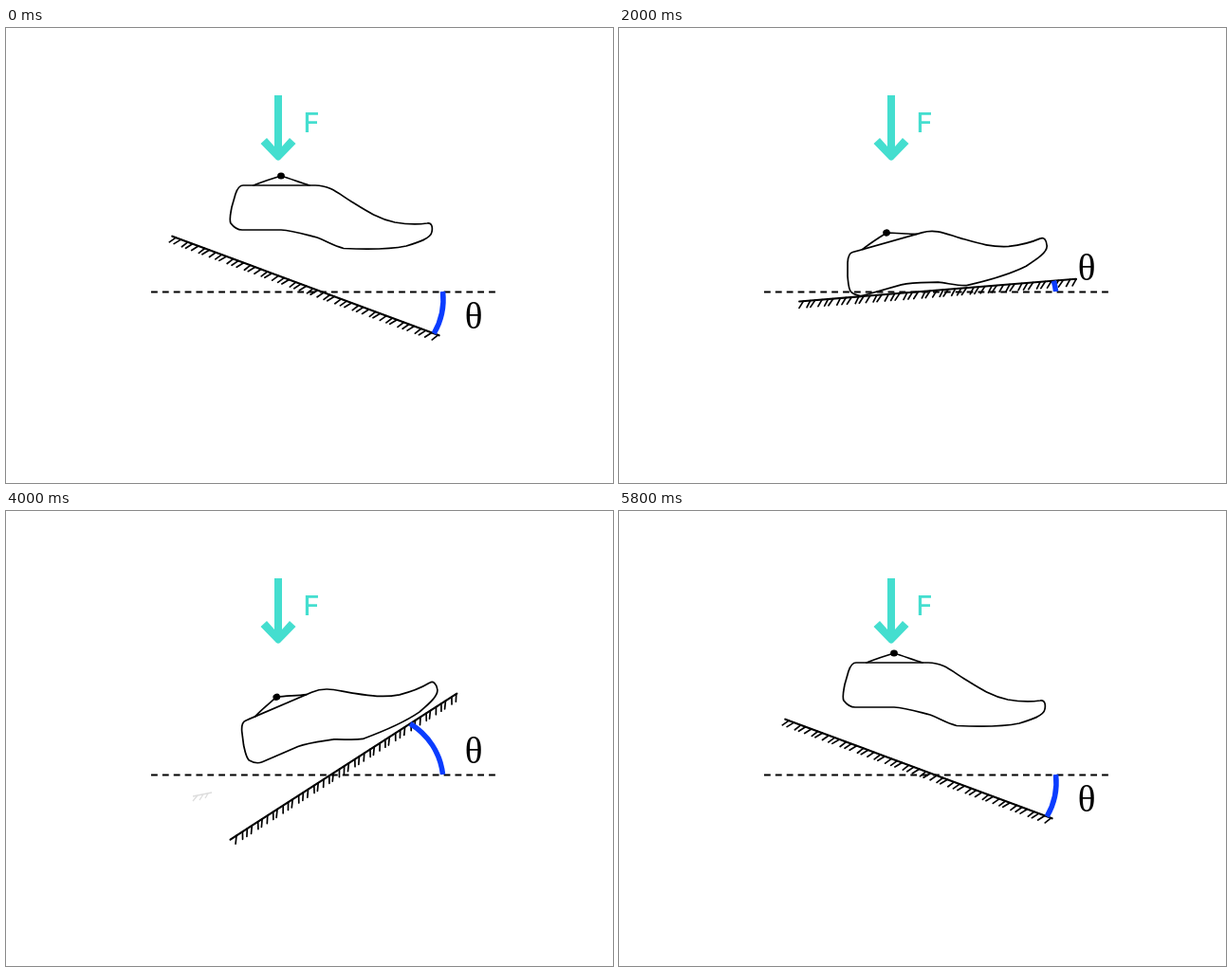
Recreate the animation shown at these times as an HTML page. Size 640 by 480 pixels, loop 6.2 s.

```html
<!DOCTYPE html>
<html lang="en">
<head>
<meta charset="utf-8">
<title>Foot on a tilting surface</title>
<style>
  html, body { margin: 0; width: 100%; height: 100%; overflow: hidden; background: #fff; }
  svg { display: block; width: 640px; height: 480px; }
  .ink { fill: none; stroke: #000; stroke-linejoin: round; stroke-linecap: round; }
  .force { fill: #44decf; }
  .force text { font: 500 29px Inter, sans-serif; }
  #theta { font: 39px "Liberation Serif", "Times New Roman", serif; text-anchor: middle; }
</style>
</head>
<body>
<svg viewBox="0 0 640 480">
  <clipPath id="view"><rect width="640" height="357"/></clipPath>

  <g class="force">
    <path d="M283 71H291V125L299 116L305.5 122L289 139Q287 140.5 285 139L268.5 122L275 116L283 125Z"/>
    <text x="313.5" y="109.5">F</text>
  </g>

  <path id="smudge" d="M197 301L217 297M202 300l-5 6M208 299l-4 6M213 298l-3 5"
        fill="none" stroke="#ddd" stroke-width="1.3"/>
  <path d="M153 278.5H516.5" fill="none" stroke="#000" stroke-width="2" stroke-dasharray="6.8 5.07"/>

  <g clip-path="url(#view)">
    <g id="ground" class="ink">
      <path id="surface" stroke-width="2.1"/>
      <path id="hatch" stroke-width="1.7"/>
    </g>
  </g>
  <path id="arc" fill="none" stroke="#0a3cff" stroke-width="5.5"/>
  <text id="theta" x="493">θ</text>

  <!-- Drawn around the ankle joint -->
  <g id="foot">
    <path class="ink" stroke-width="1.7" d="M-40 10H36C52 10 61 19 74 27C90 37 102 45 120 49
      C132 51 143 51.5 154 50C159 49 160 54 159 59C158 66 145 70 132 74
      C112 78 86 77.5 66 76.5C56 74 48 69 38 65C26 62 12 57.5 0 57H-41
      C-46 57-50 54-53 50C-55 46-53 39-52 33L-48 19C-46 13-44 10-40 10Z"/>
    <path class="ink" stroke-width="1.7" d="M-29 10C-20 6-9 3 0 0C10 3 20 7 30 10"/>
    <ellipse rx="3.9" ry="3.6"/>
  </g>
</svg>
<script>
  const STEP = 200, LOOP = 6200, LAST = 5800;
  const PIVOT_X = 335, AXIS_Y = 278, PITCH = 6.4;
  const ARC = { x: 389, y: 286, r: 72 };
  const $ = id => document.getElementById(id);
  const set = (id, name, value) => $(id).setAttribute(name, value);

  const ramp = (t, from, to) => Math.min(1, Math.max(0, (t - from) / (to - from)));
  const easeOut = (t, from, to) => 1 - (1 - ramp(t, from, to)) ** 2;

  // Lowered, pressed flat, held at the ankle's limit, then lifted
  function footPose(t) {
    return {
      x: 290 - 12 * easeOut(t, 1000, 3400) + 12 * easeOut(t, 3400, 5000),
      y: 156 + 30 * ramp(t, 0, 1000) + 30 * easeOut(t, 1000, 2000)
        - 33 * ramp(t, 3400, 4400) - 33 * ramp(t, 4400, 5800),
      turn: -31 * easeOut(t, 1400, 3400) + 31 * ramp(t, 3400, 5800)
    };
  }

  const groundTilt = t => 20.4 - 60.1 * ramp(t, 1000, 3400) + 60.1 * ramp(t, 3800, 5550);

  function drawGround(tilt, y) {
    const left = 150 + tilt, right = 144 - 0.7 * tilt;
    let ticks = "";
    for (let n = Math.ceil((4 - left) / PITCH); n * PITCH <= right; n++) {
      const wobble = Math.sin(n * 2.3) * 0.7;
      ticks += `M${n * PITCH + wobble} 0l${wobble - 4.8} 6.8`;
    }
    set("surface", "d", `M${-left} 0H${right}`);
    set("hatch", "d", ticks);
    set("ground", "transform", `translate(${PIVOT_X} ${y}) rotate(${tilt})`);
  }

  // Runs from the horizontal axis to where its circle meets the ground
  function drawArc(tilt, y) {
    const rad = tilt * Math.PI / 180, ux = Math.cos(rad), uy = Math.sin(rad);
    const dx = PIVOT_X - ARC.x, dy = y - ARC.y, dot = dx * ux + dy * uy;
    const s = Math.sqrt(dot ** 2 - dx ** 2 - dy ** 2 + ARC.r ** 2) - dot;
    const startX = ARC.x + Math.sqrt(ARC.r ** 2 - (AXIS_Y - ARC.y) ** 2);
    set("arc", "d", `M${startX} ${AXIS_Y}A${ARC.r} ${ARC.r} 0 0 ${+(tilt > 0)}
      ${PIVOT_X + s * ux} ${y + s * uy}`);
    $("arc").style.display = Math.abs(tilt) < 2 ? "none" : "";
  }

  function draw(now) {
    const t = Math.min(LAST, Math.floor((now % LOOP) / STEP) * STEP);
    const { x, y, turn } = footPose(t);
    const tilt = groundTilt(t);
    const pivotY = 276.6 + 0.006 * tilt ** 2;
    set("foot", "transform", `translate(${x} ${y}) rotate(${turn})`);
    drawGround(tilt, pivotY);
    drawArc(tilt, pivotY);
    set("theta", "y", tilt < 0 ? 265.5 : 317);
    $("smudge").style.display = t >= 2600 && t <= 4800 ? "" : "none";
  }

  const start = performance.now();
  function tick() {
    draw(performance.now() - start);
    requestAnimationFrame(tick);
  }
  tick();
</script>
</body>
</html>
```
